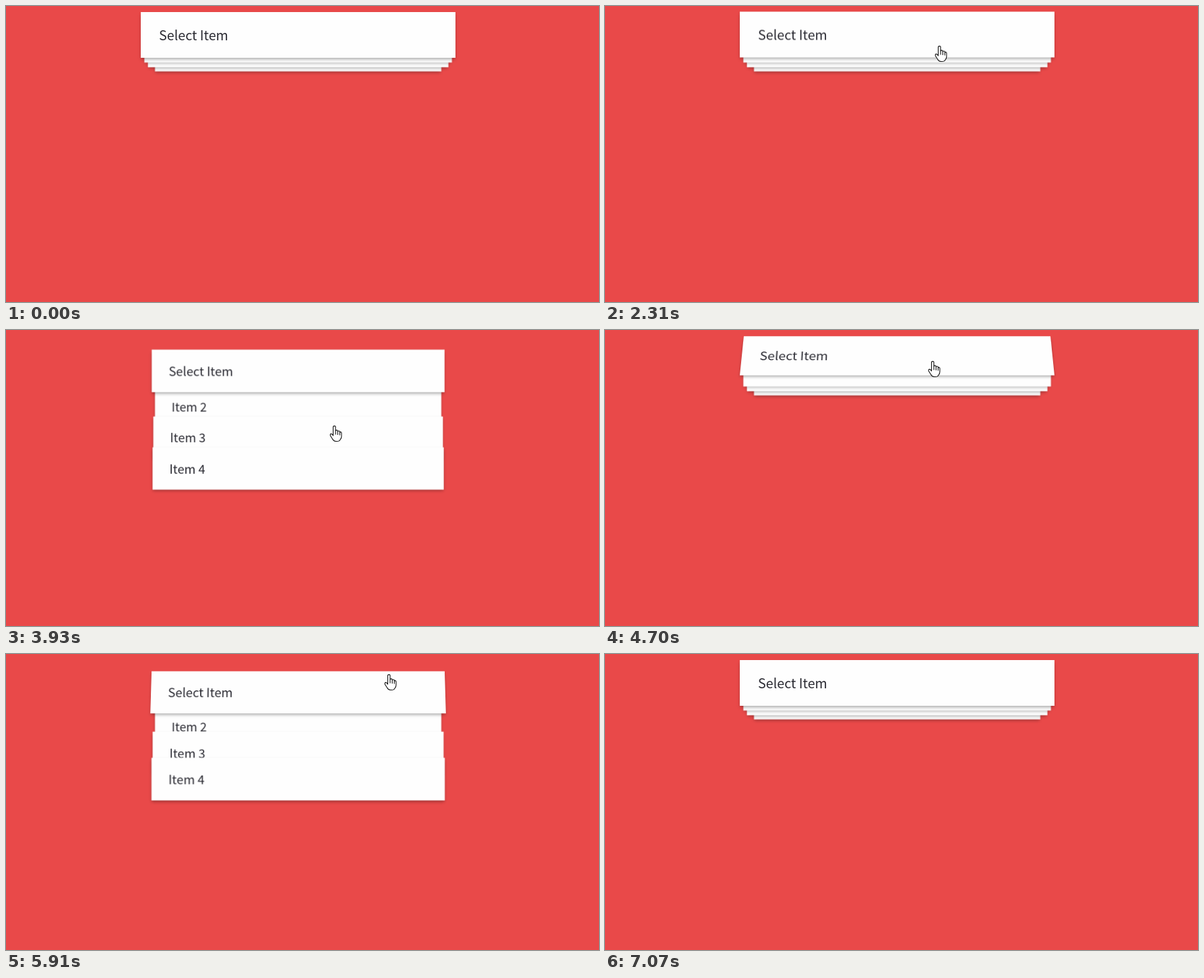
Animation, 880 px wide and 440 px high, one loop 8 s. Source, as an HTML page:

```html
<!DOCTYPE html>
<html lang="en">
<head>
<meta charset="utf-8">
<title>Stacked dropdown</title>
<style>
  html, body { margin: 0; width: 100%; height: 100%; overflow: hidden; background: #e94949; }
  .card {
    position: absolute; left: 200px; top: 0; width: 467px; height: 68px;
    box-sizing: border-box; padding-left: 27px;
    background: #fefefe; color: #2a2a32; white-space: nowrap;
    font: 400 19.7px/67px "Noto Sans CJK JP", "Noto Sans CJK SC", "Noto Sans CJK", "Noto Sans", sans-serif;
    box-shadow: 0 3px 5px -1px rgba(0, 0, 0, .35);
  }
  svg { position: absolute; left: 0; top: 0; width: 880px; height: 440px; }
  path { fill: #fff; stroke: #111; stroke-width: 1.1; stroke-linejoin: round; }
</style>
</head>
<body>
<svg>
  <g id="cursor">
    <path id="arrow" d="M.5 .5V16L4 12.8L6.4 18.5L8.7 17.5L6.4 12H11.5Z"/>
    <path id="hand" d="M-1.5 15V2.2Q-1.5 .6 .3 .6T2 2.2V13V8.4Q2 6.9 3.6 6.9T5.2 8.4V13.4V9.4Q5.2 8 6.8 8T8.3 9.6V14V11Q8.3 9.6 9.6 9.6T10.9 11.2V16Q10.9 19 9.2 20.6Q8 23.5 4 23.5H2.5Q-1 23.2 -2.5 20L-5.7 15Q-6.2 12.6 -4.6 12.4T-1.5 15Z"/>
  </g>
</svg>
<script>
const LOOP = 8000;
const HEIGHT = 68;
const OPEN_SCALE = .91;
const OPEN_MS = 300, LIFT_MS = 75, HOVER_MS = 220;

// Each span is [begin, end]
const hovers = [[1175, 1740], [2300, 3500], [4170, 4740], [5490, 6120]];
const openings = [[3040, 3880], [5793, 6440]];

// Pointer moves: [begin, end, x, y]
const entry = [863, 326];
const moves = [
  [680, 800, 605, 307], [1030, 1250, 486, 30], [1700, 1950, 494, 113],
  [2150, 2310, 496, 59], [3250, 3500, 487, 142], [3950, 4380, 486, 46],
  [4700, 5100, 805, 280], [5300, 5900, 568, 30], [5920, 6290, 581, 48],
  [6420, 6740, 823, 297], [6930, 7070, 880, 400]
];

const cursor = document.getElementById('cursor');
const arrow = document.getElementById('arrow');
const hand = document.getElementById('hand');

// Depth 0 is the head card; the deepest card goes first into the page.
const cards = [3, 2, 1, 0].map(depth => {
  const el = document.createElement('div');
  const slot = (4 - depth) % 4;
  el.className = 'card';
  el.textContent = slot ? `Item ${slot + 1}` : 'Select Item';
  document.body.insertBefore(el, document.querySelector('svg'));
  return {
    el, depth,
    closed: [43 + 7.75 * depth, 1 - .0225 * Math.floor(2 ** (depth - 1)), 0],
    open: [66 + HEIGHT * OPEN_SCALE * slot, OPEN_SCALE, 0]
  };
});

const mix = (a, b, k) => a.map((v, i) => v + (b[i] - v) * k);
const ramp = (t, begin, length) => Math.min(1, Math.max(0, (t - begin) / length));
const smooth = k => k * k * (3 - 2 * k);

// cubic-bezier(.25, .1, .25, 1)
function ease(x) {
  const curve = (u, p, q) => 3 * u * (1 - u) ** 2 * p + 3 * u * u * (1 - u) * q + u ** 3;
  let lo = 0, hi = 1;
  for (let i = 0; i < 20; i++) {
    const mid = (lo + hi) / 2;
    if (curve(mid, .25, .25) < x) lo = mid; else hi = mid;
  }
  return curve(hi, .1, 1);
}

// The head card lifts, then tilts while hovered; it swings out when left.
function headPose(t) {
  let lift = 0, tilt = 0, swing = 0;
  for (const [begin, end] of hovers) {
    const left = ramp(t, end, HOVER_MS);
    lift += ramp(t, begin, LIFT_MS) - left;
    tilt += ramp(t, begin + LIFT_MS, HOVER_MS - LIFT_MS) - left;
    swing += Math.sin(Math.PI * left);
  }
  return [43 - 4 * lift - tilt, 1 - .013 * tilt + .015 * swing, 30 * tilt];
}

function draw(t) {
  let openness = 0;
  for (const [begin, end] of openings) {
    openness += ease(ramp(t, begin, OPEN_MS)) - ease(ramp(t, end, OPEN_MS));
  }

  for (const { el, depth, closed, open } of cards) {
    const [y, scale, tilt] = mix(depth ? closed : headPose(t), open, openness);
    el.style.transform =
      `translateY(${y - HEIGHT / 2}px) perspective(1300px) rotateX(${tilt}deg) scale(${scale})`;
  }

  const [x, y] = moves.reduce(
    (from, [begin, end, ...to]) => mix(from, to, smooth(ramp(t, begin, end - begin))), entry);
  const over = x > 200 && x < 667 && y < 97 + 188 * openness;
  cursor.style.display = t >= 680 && t < 7060 ? '' : 'none';
  cursor.setAttribute('transform', `translate(${x} ${y})`);
  hand.style.display = over ? '' : 'none';
  arrow.style.display = over ? 'none' : '';
}

const start = performance.now();
function tick() {
  draw((performance.now() - start) % LOOP);
  requestAnimationFrame(tick);
}
tick();
</script>
</body>
</html>
```
